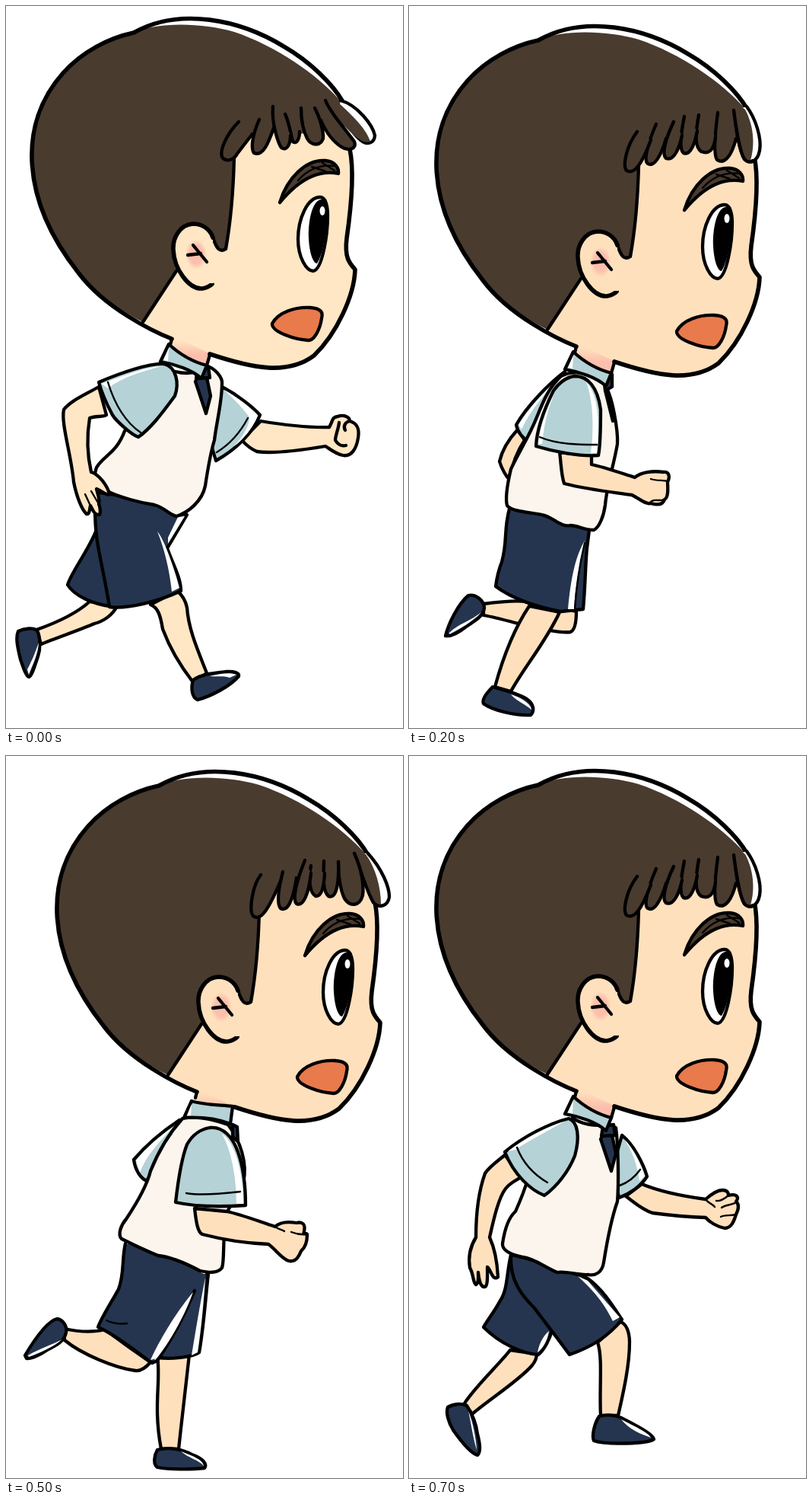
These frames come from a looping animation (522 by 948 pixels, 0.8 s). An HTML page:

```html
<!DOCTYPE html>
<html lang="en">
<head>
<meta charset="utf-8">
<title>Running boy</title>
<style>
html, body { margin: 0; width: 100%; height: 100%; overflow: hidden; background: #fff; }
svg { display: block; width: 100vw; height: 100vh; color: #ffe0bd; }
path { stroke: #000; stroke-width: 4.3; stroke-linejoin: round; stroke-linecap: round; }
.skin { fill: currentColor; }
.blue { fill: #b5d2d6; }
.navy { fill: #25354f; }
.vest { fill: #fcf5ee; }
.hair { fill: #4a3b2f; }
.white { fill: #fff; }
.line { fill: none; }
.thin { fill: none; stroke-width: 2.4; }
.bold { stroke-width: 5.6; }
.flat { stroke: none; }
.shine { fill: #fff; stroke: none; }
.pose { animation: pose .8s step-end infinite; animation-delay: calc(var(--i) * 100ms - 800ms); }
.light { color: #ffe6c4; }
#head { animation: bob .8s step-end infinite; }
.fringe { animation: .4s step-end infinite; }
.windy { animation-name: windy; }
.lean { animation-name: lean; }
.calm { animation-name: calm; }
@keyframes pose { 0% { opacity: 1 } 12.5%, 100% { opacity: 0 } }
@keyframes windy { 0% { opacity: 1 } 25%, 100% { opacity: 0 } }
@keyframes lean { 0% { opacity: 0 } 25% { opacity: 1 } 50%, 100% { opacity: 0 } }
@keyframes calm { 0% { opacity: 0 } 50%, 100% { opacity: 1 } }
@keyframes bob {
  0% { transform: translate(0, 0); color: #ffe6c4 }
  12.5% { transform: translate(30px, 0); color: #ffe0bd }
  25% { transform: translate(2px, 10px) }
  37.5% { transform: translate(2px, 3px) }
  50% { transform: translate(2px, 2px) }
  62.5% { transform: translate(33px, 4px) }
  75% { transform: translate(2px, 10px) }
  87.5%, 100% { transform: translate(2px, 3px); color: #ffe0bd }
}
</style>
</head>
<body>
<svg viewBox="0 0 522 948" preserveAspectRatio="none">
<defs>
  <linearGradient id="blush" x1="0" y1="0" x2="0" y2="1">
    <stop offset=".1" stop-color="#fbbfac" stop-opacity="0"/><stop offset=".6" stop-color="#fbbfac"/>
  </linearGradient>
  <radialGradient id="rosy">
    <stop offset=".6" stop-color="#fbbfac"/><stop offset="1" stop-color="#fbbfac" stop-opacity="0"/>
  </radialGradient>

  <!-- collars -->
  <g id="tilted">
    <path class="blue" d="M214 444L203 467C222 470 245 478 257 489L264 472C245 467 228 457 214 444Z"/>
    <path class="shine" d="M214 449L207 465L213 466Z"/>
    <path class="line" d="M264 472L268 458"/>
  </g>
  <g id="level">
    <path class="blue" d="M212 450C228 455 246 455 266 457L263 480C245 473 222 471 202 472Z"/>
    <path class="shine" d="M212 454L206 469L211 469Z"/>
  </g>
  <g id="tie">
    <path class="navy" d="M253 486L249 493L263 535L269 512L264 488Z"/>
    <path class="navy" d="M252 476L266 474L268 488L250 489Z"/>
  </g>

  <!-- legs -->
  <g id="stride">
    <path class="skin" d="M146 788C140 800 128 808 116 811C95 820 65 830 46 838L40 819C60 812 90 800 110 782Z"/>
    <path class="navy" d="M16 821C24 817 36 816 41 820C46 830 45 845 42 854C38 866 34 880 30 881C26 880 22 866 19 858C16 845 12 830 16 821Z"/>
    <path class="shine" d="M43 836C42 853 34 866 30 878L28 871C34 860 38 850 43 836Z"/>
    <path class="skin" d="M190 786C200 790 203 800 206 818C216 845 232 870 246 888L264 876C254 850 240 820 238 790C236 780 230 772 225 768Z"/>
    <path class="navy" d="M246 885C260 876 275 876 290 874C300 873 307 876 306 880C295 893 270 906 252 911C244 908 243 895 246 885Z"/>
    <path class="shine" d="M268 880C282 876 296 875 303 878L294 882C286 879 278 881 268 880Z"/>
  </g>
  <g id="stand">
    <path class="skin" d="M190 786C195 820 184 850 195 908L218 908C222 870 226 840 232 784Z"/>
    <path class="navy" d="M190 909C205 905 222 908 235 915C250 920 256 928 252 933C235 935 205 935 190 932C184 928 186 916 190 909Z"/>
    <path class="shine" d="M221 911C236 917 249 921 251 930C244 922 231 920 221 911Z"/>
  </g>
  <g id="heel">
    <path class="navy" d="M26 780C38 760 55 735 68 732C76 733 82 742 80 750C78 762 65 768 55 773C45 780 33 785 28 784Z"/>
    <path class="shine" d="M30 780C45 771 62 766 75 759C65 768 45 777 31 782Z"/>
  </g>
  <g id="push">
    <path class="skin" d="M98 785C120 782 140 780 155 782L220 795C220 810 218 820 212 822C195 824 160 815 140 810C125 806 110 802 98 800Z"/>
    <path class="navy" d="M48 827C52 810 65 785 78 774C88 772 98 780 99 790C98 802 85 808 75 815C65 823 55 828 48 827Z"/>
    <path class="shine" d="M53 823C65 811 82 807 95 796C85 808 66 818 53 825Z"/>
    <path class="skin" d="M158 788C140 815 125 850 113 894L134 900C150 870 180 835 198 796Z"/>
    <path class="navy" d="M110 894C125 898 145 903 155 910C165 917 165 926 160 931C140 932 110 925 98 916C95 910 104 900 110 894Z"/>
    <path class="shine" d="M134 904C148 908 161 917 161 924C152 916 143 914 134 904Z"/>
    <path class="navy" d="M132 660C124 690 130 700 122 730C116 745 115 755 114 762C135 778 170 790 200 795L229 792C232 760 232 730 234 712L238 680C215 670 160 655 132 660Z"/>
    <path class="shine" d="M231 702C219 722 213 750 209 792L217 792C219 760 224 735 231 702Z"/>
    <path class="thin" d="M231 705C224 735 220 760 218 792"/>
  </g>
  <g id="land">
    <path class="skin" d="M133 780C122 795 85 830 73 850L83 864C105 845 145 820 162 800C166 795 168 790 168 785Z"/>
    <path class="navy" d="M51 855C60 850 70 850 76 853C82 862 88 875 90 890C94 905 94 915 90 918C80 915 65 895 58 885C52 875 48 862 51 855Z"/>
    <path class="shine" d="M78 860C84 875 88 895 89 911C84 895 82 878 78 860Z"/>
    <path class="skin" d="M248 770C255 790 250 830 252 866L275 866C282 835 290 800 290 770C290 755 285 745 278 743Z"/>
    <path class="navy" d="M250 867C262 864 275 866 285 872C300 880 320 890 322 897C315 903 260 905 243 899C240 892 244 876 250 867Z"/>
    <path class="shine" d="M279 871C294 879 315 888 318 895C304 890 289 884 279 871Z"/>
  </g>
  <g id="backLeg">
    <path class="navy" d="M134 655C128 680 130 700 120 715C112 730 102 742 98 750C120 772 150 785 170 786C178 780 185 765 188 755L200 690Z"/>
    <path class="shine" d="M184 755C182 768 176 778 169 783C171 773 175 763 184 755Z"/>
  </g>
  <g id="foreLeg">
    <path class="navy" d="M134 655C132 690 150 710 165 725C180 745 198 768 211 786C235 778 260 765 280 740C270 725 255 700 235 686C215 678 160 660 134 655Z"/>
    <path class="shine" d="M222 683L235 689L277 737L268 742C255 715 240 700 222 683Z"/>
  </g>

  <!-- arms and vests -->
  <g id="reach">
    <path class="skin" d="M306 562C330 572 360 578 390 582C398 575 405 570 412 570C420 570 420 575 420 577C432 574 434 580 430 585C436 590 432 598 430 602C428 608 425 620 415 620C405 618 395 612 390 606C360 605 335 602 320 600C305 595 295 585 285 578Z"/>
    <path class="thin" d="M420 577C414 582 409 585 404 584M430 586C424 590 416 589 411 593M430 602C422 604 415 602 410 605M390 582C394 588 398 587 402 592"/>
  </g>
  <path id="trail" class="skin" d="M126 524C115 533 105 540 100 548C92 570 88 600 88 632C80 645 78 660 80 672C85 680 84 692 88 694C92 692 91 684 91 678C92 688 94 698 100 697C104 695 103 680 103 671C108 675 110 690 117 684C116 665 112 645 106 632C112 605 118 580 127 568C135 558 145 556 148 552Z"/>
  <path id="landVest" class="vest" d="M215 475C235 490 262 482 272 488C275 510 276 560 274 585C265 610 260 640 256 665C254 678 245 683 236 681C220 682 208 676 195 678C180 672 165 660 150 658C135 655 122 650 123 640C126 620 132 605 140 598C148 580 152 570 156 556Z"/>
  <g id="trailSleeve">
    <path class="blue" d="M126 520C150 500 185 482 210 476C222 480 225 500 218 525C210 545 195 565 178 577C160 570 138 550 126 520Z"/>
    <path class="shine" d="M130 519C152 502 180 487 204 480C180 494 157 505 140 517Z"/>
    <path class="thin" d="M142 514C150 535 165 550 182 560"/>
  </g>
  <path id="pushVest" class="vest" d="M200 486C215 478 240 480 256 496C268 510 275 560 274 575C270 600 260 630 258 655C256 670 250 685 243 688C230 688 222 682 212 682C200 685 188 670 175 668C160 665 135 664 129 656C126 645 130 625 134 608C145 585 158 565 168 540C178 515 185 500 200 486Z"/>
  <path id="pushTie" class="navy" d="M256 488L267 484L267 500L260 504L268 545L258 505Z"/>
  <g id="punch">
    <path class="skin" d="M198 586C200 600 200 615 204 627C235 635 265 638 293 642C305 648 312 655 318 653C328 656 334 654 336 648C342 645 340 630 340 625C344 617 341 611 335 612C320 610 305 612 297 619C275 612 255 605 240 602L240 590Z"/>
    <path class="thin" d="M318 621C326 624 334 622 340 624M317 652C321 646 329 651 335 648"/>
  </g>
</defs>

<g id="head">
  <path class="skin flat" d="M217 430L217 447L262 474L268 450Z"/>
  <path class="skin flat" d="M180 415L225 340L296 150L448 150L453 190C458 220 454 270 448 310C446 330 450 338 459 346C458 380 435 430 405 459C370 485 325 476 268 457L218 437Z"/>
  <path class="flat" fill="url(#blush)" d="M219 434L217 447L262 474L268 456Z"/>
  <path class="line bold" d="M452 188C459 220 453 270 448 305C445 330 451 337 459 346C458 380 435 430 405 459C370 485 325 476 268 457"/>
  <path class="white flat" d="M165 35C228 1 308 18 365 53C400 73 430 103 443 126L420 135Z"/>
  <path class="hair flat" d="M180 415C110 380 36 300 36 195C36 115 95 50 165 36C200 20 258 22 300 34C354 52 410 90 441 126L446 166L418 164L385 168L350 164L322 168L300 199C299 240 296 280 289 319C281 322 277 318 272 304L224 348Z"/>
  <path class="line bold" d="M218 437C195 428 130 397 95 350C20 255 15 155 75 88C100 60 135 42 168 35C228 1 308 18 365 53C400 73 430 103 443 126"/>
  <path class="line" d="M218 437L216 445M300 199C299 240 296 280 289 319C281 324 277 319 272 304M224 348L180 415"/>

  <g class="fringe windy">
    <path class="white" d="M440 124C462 130 482 156 485 170C484 181 474 183 466 176C452 164 443 146 438 134"/>
    <path class="hair flat" d="M436 126C458 146 474 162 479 178C466 183 450 162 430 142Z"/>
    <path class="hair" d="M420 124C426 140 445 160 458 178C462 188 450 191 441 185C430 178 420 164 414 150"/>
    <path class="hair" d="M406 134C412 145 418 165 417 174C413 185 401 183 396 174C390 162 388 148 388 134"/>
    <path class="hair" d="M367 142C372 152 375 170 377 178C382 182 386 175 386 165"/>
    <path class="hair" d="M351 132C349 155 358 180 362 186C369 191 374 182 374 170"/>
    <path class="hair" d="M333 149C325 167 321 186 326 193C338 198 345 180 352 160"/>
    <path class="hair" d="M306 152C290 168 281 189 284 198C289 206 300 202 304 194L324 168"/>
  </g>
  <g class="fringe lean" transform="translate(-30 0)">
    <path class="white" d="M473 124C492 145 501 168 501 181C499 194 487 196 480 188C471 174 467 146 455 123"/>
    <path class="hair flat" d="M446 112L470 125C483 143 490 168 490 191C476 190 468 160 446 130Z"/>
    <path class="line" d="M455 124C464 146 471 174 480 188C483 192 486 193 490 193"/>
    <path class="hair" d="M455 124C464 143 468 165 466 179C462 194 449 194 442 183C435 168 434 148 434 135"/>
    <path class="hair" d="M415 134C414 160 414 174 421 180C432 185 435 160 434 135"/>
    <path class="hair" d="M398 140C394 160 397 176 404 180C412 181 415 168 416 150"/>
    <path class="hair" d="M390 133C377 165 374 185 379 190C388 194 395 177 398 150"/>
    <path class="hair" d="M361 148C354 175 353 190 358 196C367 201 374 187 379 156"/>
    <path class="hair" d="M332 152C321 166 316 199 322 206C332 214 343 196 358 160"/>
  </g>
  <g class="fringe calm" transform="translate(-2 -10)">
    <path class="white" d="M444 132C456 148 464 174 461 190C458 205 448 208 441 201C434 190 430 160 427 137"/>
    <path class="hair flat" d="M424 122L442 136C452 154 456 180 449 203C434 202 430 160 424 140Z"/>
    <path class="line" d="M427 137C430 160 434 190 441 201C445 205 448 206 452 203"/>
    <path class="hair" d="M406 140C402 170 400 195 405 202C416 209 425 194 430 174"/>
    <path class="hair" d="M381 143C376 170 376 185 384 191C394 195 401 190 403 172"/>
    <path class="hair" d="M362 145C357 170 355 188 361 193C370 197 376 180 379 164"/>
    <path class="hair" d="M348 152C337 175 332 195 338 200C348 204 355 188 359 170"/>
    <path class="hair" d="M325 155C314 180 308 203 314 207C322 212 331 198 338 174"/>
    <path class="hair" d="M300 165C285 185 281 210 286 216C296 222 306 208 318 176"/>
  </g>

  <path class="skin bold" d="M272 304C268 292 257 286 246 286C229 287 219 304 220 320C221 345 240 372 258 371C264 370 268 368 271 365"/>
  <path class="skin flat" d="M262 302L276 321L285 324L273 364L254 364Z"/>
  <ellipse cx="250" cy="326" rx="14" ry="20" fill="url(#rosy)"/>
  <path class="line" d="M246 314L264 336M239 327L256 325"/>
  <path class="hair" d="M360 258C370 225 395 201 420 203C432 204 438 212 437 220C415 216 390 222 360 258Z"/>
  <path class="thin" d="M384 229C398 213 414 208 432 210M402 211L420 217M416 206L432 216"/>
  <path class="white" d="M413 251C396 251 384 280 384 306C384 330 395 348 404 348C416 346 423 300 423 275C423 262 420 251 413 251Z"/>
  <path class="flat" d="M414 254C402 256 397 285 398 305C399 325 404 338 409 338C418 325 422 290 422 272C422 260 419 253 414 254Z"/>
  <ellipse class="shine" cx="416" cy="269" rx="3.5" ry="6"/>
  <path fill="#e87a4c" d="M350 417C358 402 380 395 400 396C415 397 417 403 415 410C413 425 405 439 398 439C380 438 349 428 350 417Z"/>
</g>

<g class="pose light" style="--i:0">
  <path class="skin" d="M335 545C365 550 395 554 425 553C430 545 428 540 436 539C445 536 452 540 452 545C462 548 465 555 463 567C461 580 455 592 443 590C433 588 425 581 420 578C390 583 350 588 330 585C318 580 312 572 310 570Z"/>
  <path class="line" d="M438 547C437 556 433 564 433 570C437 577 443 578 447 577M452 545C446 546 443 552 446 557"/>
  <path class="blue" d="M284 500C305 511 325 527 334 537C325 560 303 582 276 597L265 560Z"/>
  <path class="shine" d="M287 504C305 514 322 528 331 538C324 555 311 570 300 578C313 564 320 550 320 540C310 526 299 516 287 504Z"/>
  <path class="thin" d="M318 541C308 560 295 575 277 586"/>
  <use href="#stride"/>
  <path class="navy" d="M118 690C108 715 85 745 81 760C90 775 115 785 136 788L140 700Z"/>
  <path class="navy" d="M117 638C116 690 120 705 126 735C131 760 134 775 136 789C160 792 200 782 230 768C230 750 218 730 212 712L238 668L200 650Z"/>
  <path class="shine" d="M199 690C208 700 222 740 228 764L218 769C215 740 208 712 199 690ZM235 670L226 671L213 698L213 706Z"/>
  <path class="vest" d="M200 470C215 480 245 490 262 472C275 475 285 488 284 496C284 520 277 545 274 570C268 590 265 610 262 630C258 650 240 665 224 670C214 668 208 658 195 655C175 652 150 645 135 638C118 632 114 620 119 606C128 590 145 588 156 558L175 540Z"/>
  <use href="#tie"/><use href="#tilted"/>
  <path class="skin" d="M122 500C105 510 85 518 76 530C72 548 86 590 89 625C93 645 100 662 106 667C110 668 110 660 111 656C115 664 117 668 122 668C125 668 124 658 122 654C124 648 120 640 119 634C128 638 136 645 136 640C132 628 122 615 112 612C107 590 106 565 110 541C118 538 128 540 132 537Z"/>
  <path class="thin" d="M104 641L111 656M112 637L122 654"/>
  <path class="blue" d="M122 494C150 482 190 468 208 470C224 474 228 495 222 512C205 535 190 555 174 566C165 563 145 545 140 537C132 522 125 505 122 494Z"/>
  <path class="shine" d="M126 496C155 485 185 474 204 473C175 481 152 488 134 502Z"/>
  <path class="thin" d="M134 494C142 520 155 545 177 560"/>
</g>

<g class="pose" style="--i:1">
  <path class="skin" d="M298 594C315 600 335 610 349 614C355 608 365 605 375 608C380 613 380 618 380 620C388 622 388 630 387 638C384 650 378 655 370 655C360 655 348 645 340 636C325 634 308 630 292 624Z"/>
  <path class="line" d="M349 614C354 617 360 617 363 613M375 609C373 624 364 630 358 628C361 638 357 646 361 651M380 620C376 619 373 622 371 625"/>
  <path class="skin" d="M72 748C95 752 120 752 130 752L160 780L184 784C184 796 178 805 168 806C145 807 100 790 76 768Z"/>
  <use href="#heel"/><use href="#stand"/>
  <path class="navy" d="M150 690C140 710 122 730 115 746C125 755 145 765 163 780L175 700Z"/>
  <path class="navy" d="M154 640C150 680 155 700 160 725C162 750 163 770 165 783C195 787 230 782 254 776C255 750 252 710 248 690C254 684 258 676 258 670L200 640Z"/>
  <path class="shine" d="M246 692C243 720 241 750 242 776L251 774C252 745 250 715 246 692Z"/>
  <path class="vest" d="M236 470C250 475 275 480 292 485C300 500 307 530 305 555C300 580 296 600 296 625C292 645 292 652 288 656L262 670C245 668 225 650 205 645C185 640 160 635 152 632C146 628 148 615 155 605C165 590 175 575 186 556L215 500Z"/>
  <use href="#tie" x="29"/><use href="#tilted" x="30"/>
  <path class="skin" d="M186 556C182 570 178 585 176 596C195 620 225 645 252 656C250 668 254 676 256 682C262 682 264 680 266 680C270 682 278 682 279 676C283 676 285 665 283 658C278 652 265 650 255 648C240 630 225 610 215 590L217 576Z"/>
  <path class="thin" d="M256 682C254 675 256 671 259 669M267 680C265 675 268 670 270 668M279 676C276 672 278 668 279 665"/>
  <path class="blue" d="M235 473C255 472 270 485 275 500C274 530 256 560 241 578C230 580 205 570 190 560C180 545 170 530 166 518C185 500 215 480 235 473Z"/>
  <path class="shine" d="M170 517C190 500 212 485 230 478C205 495 188 510 178 531Z"/>
  <path class="thin" d="M186 522C195 545 220 565 242 570"/>
</g>

<g class="pose" style="--i:2">
  <path class="skin" d="M143 556C130 570 122 585 119 598C122 608 128 618 132 622C135 605 142 585 152 570Z"/>
  <path class="blue" d="M205 480C185 495 155 525 141 550C143 560 150 568 156 570L175 560L200 500Z"/>
  <path class="shine" d="M196 490C178 506 156 530 144 550L148 556C160 530 178 510 196 490Z"/>
  <use href="#push"/><use href="#pushVest"/><use href="#pushTie"/>
  <use href="#tilted" x="2" y="10"/><use href="#punch"/>
  <path class="blue" d="M218 486C235 486 248 500 252 530C252 555 252 575 249 590C225 592 190 585 167 578C168 555 180 525 190 505C198 494 208 487 218 486Z"/>
  <path class="shine" d="M192 507C181 528 172 553 170 575L175 575C178 545 184 525 192 507ZM233 494C243 520 243 560 239 587L247 587C251 555 250 510 233 494Z"/>
  <path class="thin" d="M172 566C195 576 225 576 247 576"/>
</g>

<g class="pose" style="--i:3">
  <use href="#trail"/><use href="#trailSleeve"/>
  <use href="#land"/><use href="#foreLeg"/><use href="#backLeg"/>
  <use href="#landVest"/><use href="#level" x="2" y="3"/><use href="#reach"/>
  <path class="blue" d="M243 498C254 487 270 488 282 498C298 512 309 535 314 554C304 569 286 580 268 586C253 570 239 545 236 522C235 510 238 503 243 498Z"/>
  <path class="shine" d="M284 503C298 518 307 536 311 553L302 562C302 540 295 520 284 503Z"/>
  <path class="thin" d="M304 546C294 561 280 570 263 576"/>
</g>

<g class="pose" style="--i:4">
  <path class="skin" d="M122 504C105 510 85 520 79 530C74 545 86 585 92 610C90 625 95 640 102 648C105 658 108 666 112 669L122 670L135 640L112 608C108 590 108 560 113 547C120 542 130 540 138 541Z"/>
  <path class="thin" d="M107 634L120 629M108 648L116 640M110 663L114 654"/>
  <path class="blue" d="M122 498C145 488 180 476 205 474L190 510L155 558C140 545 128 525 122 498Z"/>
  <path class="shine" d="M126 499C148 490 175 480 194 478C175 486 150 494 131 508Z"/>
  <use href="#stride" x="3"/>
  <path class="navy" d="M215 722C222 735 230 755 231 768C220 778 195 785 180 785L200 700Z"/>
  <path class="shine" d="M216 728C222 742 228 755 228 767L221 771C220 752 216 740 213 732Z"/>
  <path class="navy" d="M125 632C115 640 112 665 122 690C118 710 95 735 90 756C110 775 145 792 178 793C190 785 205 755 215 725C225 705 232 690 235 672L170 650Z"/>
  <path class="shine" d="M231 677C215 710 193 745 172 790L180 789C200 760 220 715 231 677Z"/>
  <path class="thin" d="M137 645C126 660 130 676 122 690"/>
  <path class="vest" d="M205 476C225 474 262 478 270 482C285 486 288 500 285 510L275 580C262 595 264 630 264 655C255 668 240 674 232 673C215 668 200 655 175 652C160 650 130 640 122 628C118 615 120 605 128 595C140 590 148 575 155 555C162 530 175 500 190 480Z"/>
  <use href="#level" x="2" y="2"/>
  <path class="skin" d="M336 547C365 553 395 555 420 556C428 545 440 540 452 542C455 544 455 546 455 549C462 545 468 548 466 553C472 560 466 568 465 575C462 585 455 592 445 591C435 588 425 582 420 580C395 583 365 590 340 586C325 582 318 578 313 573Z"/>
  <path class="thin" d="M420 556C426 560 430 558 433 562M455 549C450 551 446 554 443 557M466 553C461 558 456 559 453 564"/>
  <path class="blue" d="M245 495C258 486 272 488 285 497C305 512 325 530 336 542C325 560 305 582 277 594C262 580 245 550 237 522C236 510 238 500 245 495Z"/>
  <path class="shine" d="M284 500C304 514 322 530 333 542C322 560 306 575 288 586C308 570 321 553 323 541C311 527 298 514 284 500Z"/>
  <path class="thin" d="M322 540C312 560 295 575 275 584"/>
</g>

<g class="pose" style="--i:5">
  <path class="blue" d="M228 478C210 490 185 510 168 530C170 545 178 555 185 558L215 510Z"/>
  <path class="shine" d="M220 487C202 499 184 515 171 531L176 547C184 525 202 506 220 487Z"/>
  <path class="skin" d="M76 752C95 756 115 757 130 753L160 775L190 796C184 803 178 808 170 807C145 804 100 786 77 767Z"/>
  <use href="#heel" x="-1" y="7"/><use href="#stand" x="9" y="2"/>
  <path class="navy" d="M266 680C262 715 260 750 254 783C245 790 215 792 200 790L230 700Z"/>
  <path class="shine" d="M262 685C256 715 250 750 244 787L252 783C257 750 260 715 262 685Z"/>
  <path class="navy flat" d="M157 640C152 660 156 680 148 700C140 715 125 738 121 750C145 760 175 785 192 797C205 782 225 740 248 702L264 682L200 650Z"/>
  <path class="line" d="M157 640C152 660 156 680 148 700C140 715 125 738 121 750C145 760 175 785 192 797L199 794C215 770 235 735 248 702"/>
  <path class="shine" d="M246 704C228 725 205 760 190 793L198 791C215 770 235 735 246 704Z"/>
  <path class="thin" d="M132 741C142 746 151 746 159 745"/>
  <path class="vest" d="M232 476C250 472 275 478 292 484C308 505 318 535 312 560L290 600C284 630 288 660 284 672C278 680 265 678 255 676C240 668 220 658 200 656C185 650 160 638 152 634C146 628 152 615 158 608C170 590 185 565 190 545C200 520 215 495 232 476Z"/>
  <path class="navy" d="M298 484L304 487L305 506L298 500Z"/>
  <use href="#level" x="32" y="3"/>
  <path class="skin" d="M248 594C250 612 252 625 258 628C285 635 320 640 345 641C355 648 362 660 372 663C382 665 386 655 388 650C394 645 396 635 396 628C394 625 390 630 392 624C394 615 390 611 382 613C370 611 360 612 354 618C335 612 310 602 290 598Z"/>
  <path class="thin" d="M354 618C358 622 362 621 366 624M396 628C388 629 380 627 375 625"/>
  <path class="blue" d="M268 488C285 486 298 500 305 520C314 545 315 570 315 590C285 592 250 592 223 586C226 560 230 530 238 510C246 496 256 490 268 488Z"/>
  <path class="shine" d="M284 496C297 520 303 555 303 588L312 588C312 555 304 510 284 496Z"/>
  <path class="thin" d="M237 574C260 578 290 574 308 572"/>
</g>

<g class="pose" style="--i:6">
  <use href="#punch"/><use href="#push"/><use href="#pushVest"/><use href="#pushTie"/>
  <use href="#tilted" x="2" y="10"/>
  <path class="skin" d="M143 556C130 570 120 588 119 600C130 620 160 645 188 656C194 666 206 670 213 663C219 656 214 645 204 642C190 636 168 612 157 598L168 578Z"/>
  <path class="blue" d="M212 482C226 488 229 510 220 532C207 560 190 574 172 584C160 577 145 563 139 550C155 522 185 490 212 482Z"/>
  <path class="shine" d="M143 550C158 525 182 500 205 487C182 508 162 530 151 559Z"/>
  <path class="thin" d="M154 546C162 560 171 567 182 573"/>
</g>

<g class="pose" style="--i:7">
  <use href="#reach"/>
  <path class="blue" d="M280 498C295 510 308 535 313 552C305 565 290 575 276 580L268 540Z"/>
  <path class="shine" d="M283 503C296 516 305 536 310 552L303 558C300 535 293 518 283 503Z"/>
  <path class="thin" d="M304 543C297 553 288 560 277 564"/>
  <use href="#land"/><use href="#backLeg"/><use href="#foreLeg"/>
  <use href="#landVest"/><use href="#tie" x="3" y="10"/><use href="#tilted" x="2" y="3"/>
  <use href="#trail"/><use href="#trailSleeve"/>
</g>
</svg>
</body>
</html>
```
